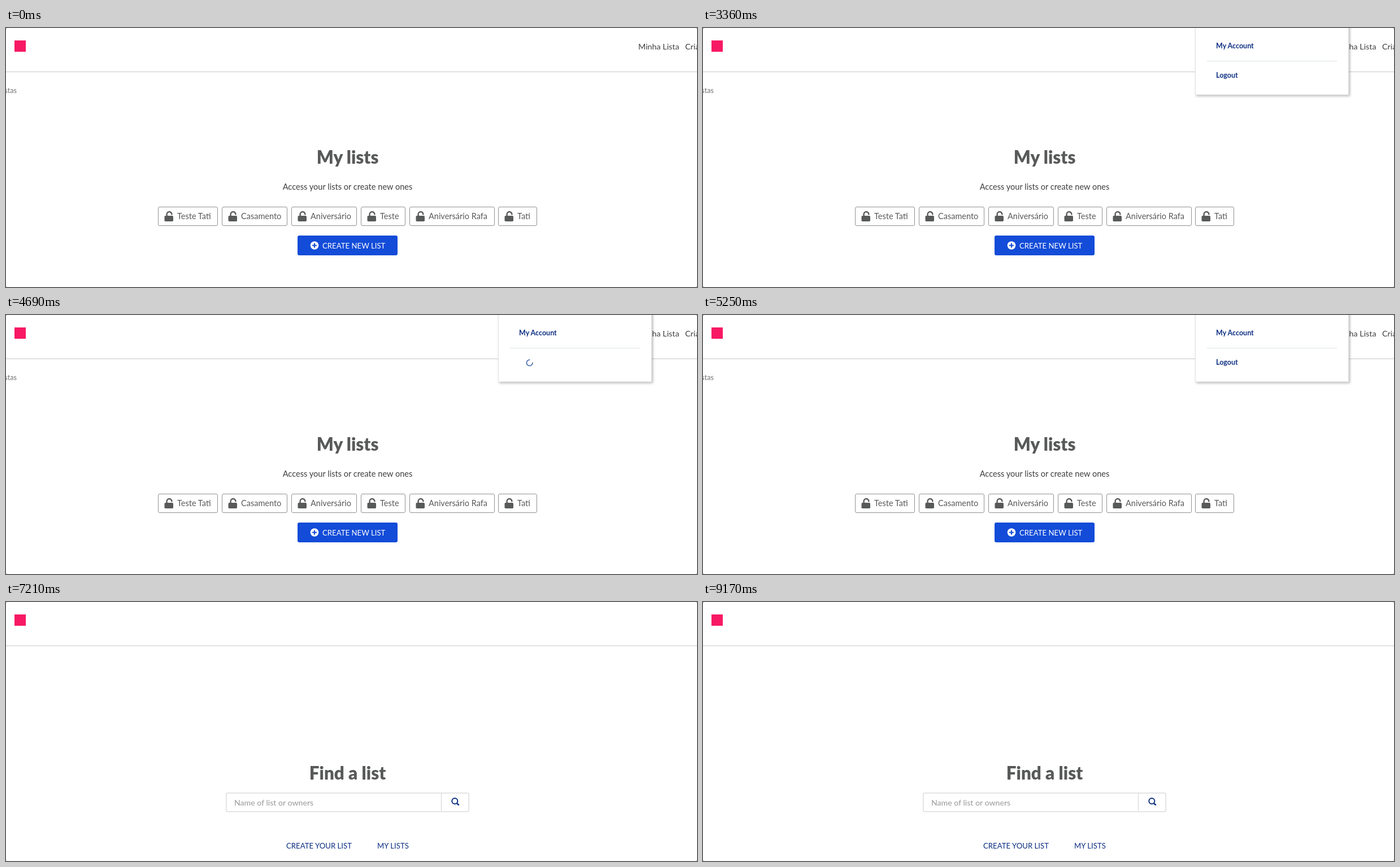
An HTML page for the animation above (9.52 s loop, 1223x458 px).

```html
<!DOCTYPE html>
<html lang="en">
<head>
<meta charset="utf-8">
<title>My lists</title>
<style>
  html, body { margin: 0; width: 100%; height: 100%; overflow: hidden; background: #8c8c8c; }
  svg { display: block; width: 1223px; height: 458px; font: 14.5px Lato, "Open Sans", sans-serif; fill: #3f3f40; }
  .title { font-size: 31.4px; font-weight: 900; fill: #585959; }
  .mid { text-anchor: middle; }
  .caps { font-size: 13.2px; }
  .link { fill: #0c2f82; }
  .bold { font-size: 12.5px; font-weight: 700; }
  #boxes { fill: #585959; }
  #boxes rect.frame { fill: #fff; stroke: #929292; }
  #menu { filter: drop-shadow(2px 2px 2px rgba(0, 0, 0, .28)); }
</style>
</head>
<body>
<svg viewBox="0 0 1223 458">
  <defs>
    <g id="lock">
      <rect x="11.5" y="332" width="15.5" height="10" rx="1.8"/>
      <path d="M15.6 333v-3.6a4.4 4.4 0 0 1 8.8 0" fill="none" stroke="#585959" stroke-width="2.4" stroke-linecap="round"/>
    </g>
  </defs>
  <rect width="1223" height="458" rx="2.5" fill="#fff"/>
  <rect x="15" y="22" width="20" height="20" fill="#f71963"/>
  <path d="M0 77.5H1223" stroke="#c8c8c8"/>

  <g id="lists">
    <text x="1119" y="38" font-size="14.3">Minha Lista</text>
    <text x="1202" y="38" font-size="14.3">Criar Lista</text>
    <text x="19" y="115" text-anchor="end" font-size="12.6" fill="#727273">Listas</text>
    <text class="title mid" x="604.5" y="240">My lists</text>
    <text class="mid" x="604.5" y="286" font-size="14.6">Access your lists or create new ones</text>
    <g id="boxes"></g>
    <rect x="516" y="367" width="177" height="35" rx="3" fill="#134cd8"/>
    <circle cx="546" cy="384.5" r="7.3" fill="#fff"/>
    <path d="M542 384.5h8m-4-4v8" stroke="#134cd8" stroke-width="2.2"/>
    <text class="caps" x="560" y="390" fill="#fff">CREATE NEW LIST</text>
  </g>

  <g id="menu">
    <rect x="871.5" y="-10" width="271" height="128" fill="#fff" stroke="#e3e4e6"/>
    <path d="M892 58.5H1122" stroke="#e0e1e3"/>
    <text class="link bold" x="908" y="36">My Account</text>
    <text class="link bold" id="logout" x="908" y="88">Logout</text>
    <path id="spinner" d="M932 84.5a5.3 5.3 0 1 1-5.3-5.3" fill="none" stroke="#3559a8" stroke-width="1.5" stroke-linecap="round"/>
  </g>

  <g id="search">
    <text class="title mid" x="604.5" y="314">Find a list</text>
    <rect x="389.75" y="337.75" width="429.5" height="33" rx="3" fill="#fff" stroke="#dcdddf" stroke-width="1.5"/>
    <path d="M770.5 338V371" stroke="#dcdddf" stroke-width="1.5"/>
    <text x="404" y="360" font-size="14.15" fill="#979899">Name of list or owners</text>
    <g fill="none" stroke="#0c2f82" stroke-width="2">
      <circle cx="794.3" cy="352" r="5"/>
      <path d="M798 355.8l3.6 3.6" stroke-width="2.6"/>
    </g>
    <text class="link caps" x="496" y="436">CREATE YOUR LIST</text>
    <text class="link caps" x="657" y="436">MY LISTS</text>
  </g>
</svg>
<script>
const LOOP = 9520, MENU = 3360, BUSY = 4550, IDLE = 5250, FIND = 7210;
const TURN = 1000; // spinner period
const el = id => document.getElementById(id);
const show = (id, on) => el(id).style.display = on ? "" : "none";

// left edge, width, label
el("boxes").innerHTML = [
  [269, 106, "Teste Tati"], [382, 116, "Casamento"], [505, 116, "Aniversário"],
  [628, 79, "Teste"], [714, 151, "Aniversário Rafa"], [871, 69, "Tati"]
].map(([x, w, label]) => `
  <rect class="frame" x="${x + .5}" y="316.5" width="${w - 1}" height="33" rx="2.5"/>
  <use href="#lock" x="${x}"/>
  <text x="${x + 34}" y="338">${label}</text>`).join("");

function draw() {
  const t = performance.now() % LOOP;
  const busy = t >= BUSY && t < IDLE;
  show("lists", t < FIND);
  show("menu", t >= MENU && t < FIND);
  show("logout", !busy);
  show("spinner", busy);
  show("search", t >= FIND);
  const angle = (t - BUSY - 140) / TURN * 360;
  el("spinner").setAttribute("transform", `rotate(${angle} 926.7 84.5)`);
  requestAnimationFrame(draw);
}
draw();
</script>
</body>
</html>
```
